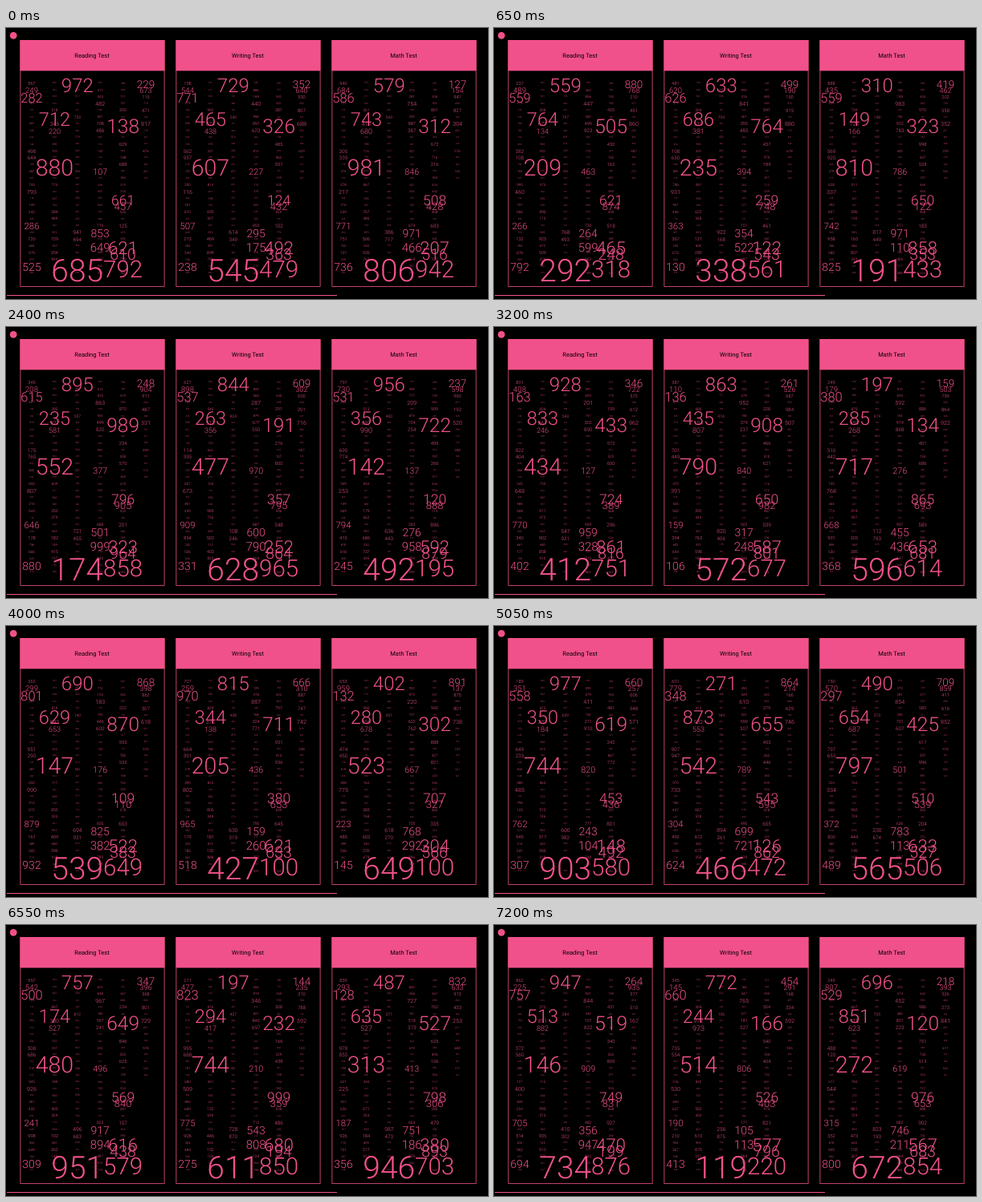
An HTML page that plays this animation: 600x338 px, repeating every 7250 ms.

```html
<!DOCTYPE html>
<html lang="en">
<head>
<meta charset="utf-8">
<title>Test scores</title>
<style>
  html, body { margin: 0; width: 100%; height: 100%; overflow: hidden; background: #000; }
  svg { display: block; width: 600px; height: 338px; }
  text {
    font-family: Roboto, "Liberation Sans", sans-serif;
    text-anchor: middle;
    text-rendering: geometricPrecision;
  }
  .score { font-weight: 300; fill: #f1518a; }
  .title { font-size: 7.55px; font-weight: 400; fill: #000; }
</style>
</head>
<body>
<svg id="stage" viewBox="0 0 600 338"></svg>
<script>
const PINK = '#f1518a';
const STEP = 50, STEPS = 145;
const COLS = 6, ROWS = 29, SHORT_ROWS = 15;
const PANEL_GAP = 194;
const TITLES = ['Reading Test', 'Writing Test', 'Math Test'];

// Font sizes of the prominent scores, by column and row; the rest are seeded.
const LARGE = {
  '0,1': 9.5, '0,2': 16.5, '0,21': 11.5, '0,27': 14,
  '1,5': 23.5, '1,7': 9, '1,12': 28.5,
  '2,0': 24, '2,27': 39,
  '3,13': 10.8, '3,22': 14, '3,24': 15,
  '4,6': 24.5, '4,17': 17.5, '4,18': 13, '4,24': 22, '4,25': 19.5, '4,27': 29.5,
  '5,0': 13.5, '5,1': 9
};

const stage = document.getElementById('stage');

function add(tag, attrs, content = '') {
  const el = document.createElementNS('http://www.w3.org/2000/svg', tag);
  for (const name in attrs) el.setAttribute(name, attrs[name]);
  el.textContent = content;
  stage.appendChild(el);
  return el;
}

// Repeatable random value in 0..1 for a pair of integers.
function noise(a, b) {
  let h = Math.imul(a + 1, 374761393) ^ Math.imul(b + 1, 668265263);
  h = Math.imul(h ^ (h >>> 13), 1274126177);
  h = Math.imul(h ^ (h >>> 16), 2246822519);
  return ((h ^ (h >>> 15)) >>> 0) / 4294967296;
}

// Most seeded sizes are tiny, a few reach legible size.
function sizeAt(col, row) {
  return LARGE[`${col},${row}`] || 2.8 + 4.6 * noise(col, 100 + row) ** 3;
}

const scores = [];

function addScore(left, col, row) {
  const size = sizeAt(col, row);
  const middle = 68.5 + 8.46 * row + 0.15 * (size - 4);
  scores.push(add('text', {
    class: 'score',
    x: left + 14.5 + 28.4 * col,
    y: middle + 0.356 * size,
    'font-size': size
  }));
}

function addPanel(title, index) {
  const left = 17.5 + index * PANEL_GAP;
  add('rect', {
    x: left + 0.4, y: 15.4, width: 179.2, height: 307,
    fill: 'none', stroke: PINK, 'stroke-width': 0.8
  });
  add('rect', { x: left, y: 15, width: 180, height: 38.4, fill: PINK });
  add('text', { class: 'title', x: left + 89.5, y: 37.4 }, title);
  for (let col = 0; col < COLS; col++) {
    const rows = col === COLS - 1 ? SHORT_ROWS : ROWS;
    for (let row = 0; row < rows; row++) addScore(left, col, row);
  }
}

function draw(step) {
  scores.forEach((el, i) => {
    el.textContent = 100 + Math.floor(900 * noise(i, step));
  });
}

add('circle', { cx: 9.2, cy: 9.3, r: 4.4, fill: PINK });
add('rect', { x: 1, y: 333, width: 411, height: 1, fill: PINK });
TITLES.forEach(addPanel);

const start = performance.now();
let shown = 0;
draw(0);

function tick() {
  const step = Math.floor((performance.now() - start) / STEP) % STEPS;
  if (step !== shown) draw(shown = step);
  requestAnimationFrame(tick);
}
requestAnimationFrame(tick);
</script>
</body>
</html>
```
